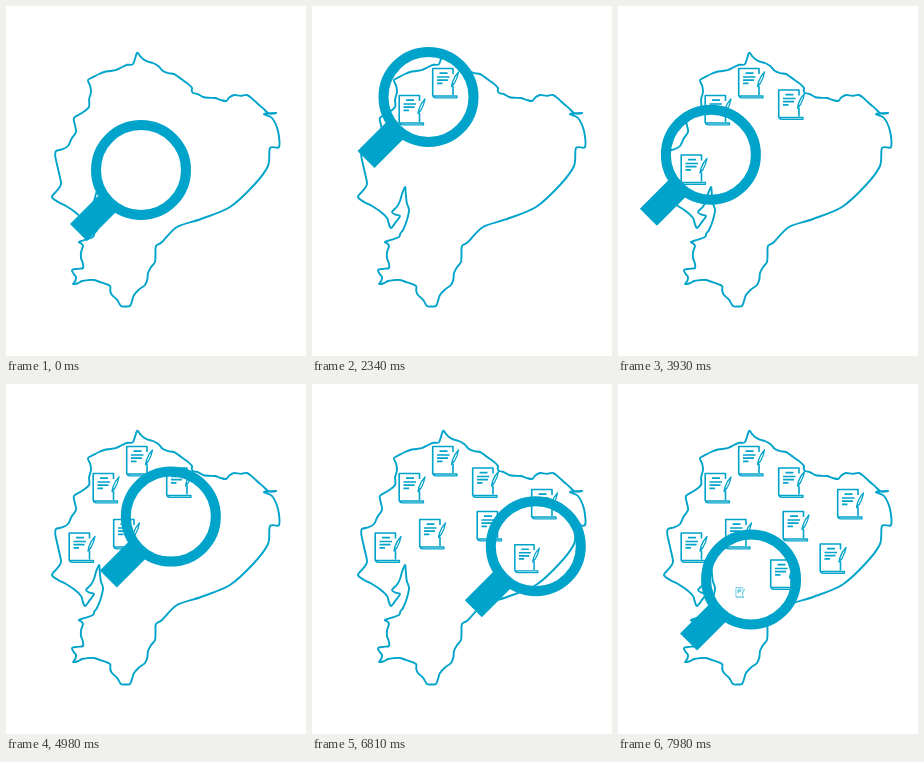
An HTML page for the animation above (8000 ms loop, 300 by 350 pixels).

```html
<!DOCTYPE html>
<html lang="en">
<head>
<meta charset="utf-8">
<title>Map search</title>
<style>
  html, body { margin: 0; width: 100%; height: 100%; overflow: hidden; background: #fff; }
  svg { display: block; width: 100vw; height: 100vh; }
</style>
</head>
<body>
<svg viewBox="0 0 300 350" fill="none" stroke="#00a3ca" stroke-linejoin="round">
  <defs>
    <g id="doc" stroke-width="1.6">
      <path d="M8 -9V-14.5H-12.3V13M8 3V12"/>
      <path d="M-12 13H12V14.8H-9Q-12 14.8 -12 13Z" stroke-width="1.3"/>
      <path d="M-5.5 -9.8H2.5M-8 -6H4.5M-8 -2.8H3M-8 .4H-2.5" stroke-width="1.7"/>
      <path d="M13.5 -11Q9.5 -7 7.5 -1L6.5 3.5L9.5 0Q12.5 -5 13.5 -11Z" stroke-width="1.3"/>
    </g>
  </defs>
  <path id="map" stroke-width="1.9"/>
  <g id="docs"></g>
  <g id="lens">
    <circle r="45" stroke-width="10"/>
    <path d="M-71 54L-54 71L-21 38L-38 21Z" fill="#00a3ca" stroke="none"/>
  </g>
</svg>
<script>
const LOOP = 8000, STEP = 30;
const GRAB = [9.7, -12.5];       // glass centre relative to the document it finds
const POP_LEAD = 140, POP_TIME = 195;
const $ = id => document.getElementById(id);

// Each document: arrival time of the glass, then its own centre
const finds = [
  [1437, 133, 77], [2175, 99.5, 104], [2915, 173, 98.5],
  [3680, 75.5, 163.5], [4530, 120, 150], [5335, 177.5, 142],
  [6040, 232, 120], [6765, 214.5, 174.5], [7460, 165, 190.5],
  [8055, 122, 208.5]
].map(([t, x, y]) => ({ t, x, y }));

const stops = [
  { t: 510, x: 135, y: 164 },
  ...finds.map(({ t, x, y }) => ({ t, x: x + GRAB[0], y: y + GRAB[1] }))
];

// Key points of the outline, clockwise from the northern tip
const north = [
  131,47, 137,53, 147,57, 157,65, 168,68, 178,75, 186,82, 187,87, 197,91,
  209,92, 220,95, 228,89, 241,89, 252,98, 262,107, 270,107
];
const border = [
  258,108, 266,112, 272,125, 273,141, 264,142, 262,160, 248,179, 224,201,
  195,213, 171,221, 156,236
];
const coast = [
  150,240, 149,256, 142,267, 139,279, 128,289, 124,300, 115,300, 106,289,
  104,280, 88,274, 76,275, 67,278, 70,271, 66,264, 77,262, 75,252, 77,240,
  73,236, 87,231, 91,224, 97,204, 94,190, 93,181, 88,195, 80,206, 88,210,
  79,222, 75,212, 60,200, 46,191, 55,178, 50,154, 50,145, 62,140, 70,126,
  68,112, 83,101, 85,86, 82,74, 93,68, 104,65, 116,61, 127,58
];

const pairs = flat => flat.flatMap((x, i) => i % 2 ? [] : [[x, flat[i + 1]]]);

// Push the middle of each segment sideways for a ragged shore
function ragged(points, depth) {
  return points.flatMap((a, i) => {
    const b = points[i + 1];
    if (!b) return [a];
    const dx = b[0] - a[0], dy = b[1] - a[1];
    const push = depth * Math.sin(i * 2.4) / Math.hypot(dx, dy);
    return [a, [(a[0] + b[0]) / 2 - dy * push, (a[1] + b[1]) / 2 + dx * push]];
  });
}

// Closed Catmull-Rom curve
function smooth(points) {
  const n = points.length, k = 0.15;
  const p = i => points[(i + n) % n];
  let d = "M" + p(0);
  for (let i = 0; i < n; i++) {
    const [a, b, c, e] = [p(i - 1), p(i), p(i + 1), p(i + 2)];
    const c1 = b.map((v, j) => v + (c[j] - a[j]) * k);
    const c2 = c.map((v, j) => v - (e[j] - b[j]) * k);
    d += `C${c1} ${c2} ${c}`;
  }
  return d + "Z";
}

const clamp = v => Math.max(0, Math.min(1, v));
const ease = u => u < 0.5 ? 2 * u * u : 1 - 2 * (1 - u) * (1 - u);

function lensAt(t) {
  const next = Math.max(1, stops.findIndex(s => t < s.t));
  const a = stops[next - 1], b = stops[next];
  const p = ease(clamp((t - a.t) / (b.t - a.t)));
  return [a.x + (b.x - a.x) * p, a.y + (b.y - a.y) * p];
}

const docs = finds.map(() => {
  const use = document.createElementNS("http://www.w3.org/2000/svg", "use");
  use.setAttribute("href", "#doc");
  return $("docs").appendChild(use);
});

function draw(t) {
  $("lens").setAttribute("transform", `translate(${lensAt(t)})`);
  finds.forEach((find, i) => {
    const size = clamp((t - find.t + POP_LEAD) / POP_TIME);
    docs[i].setAttribute("visibility", size > 0 ? "visible" : "hidden");
    docs[i].setAttribute("transform", `translate(${find.x},${find.y}) scale(${size})`);
  });
}

function tick() {
  const t = performance.now() % LOOP;
  draw(Math.floor(t / STEP) * STEP);
  requestAnimationFrame(tick);
}

$("map").setAttribute("d", smooth([
  ...ragged(pairs(north), 0.9),
  ...pairs(border),
  ...ragged(pairs(coast), 0.9)
]));
tick();
</script>
</body>
</html>
```
